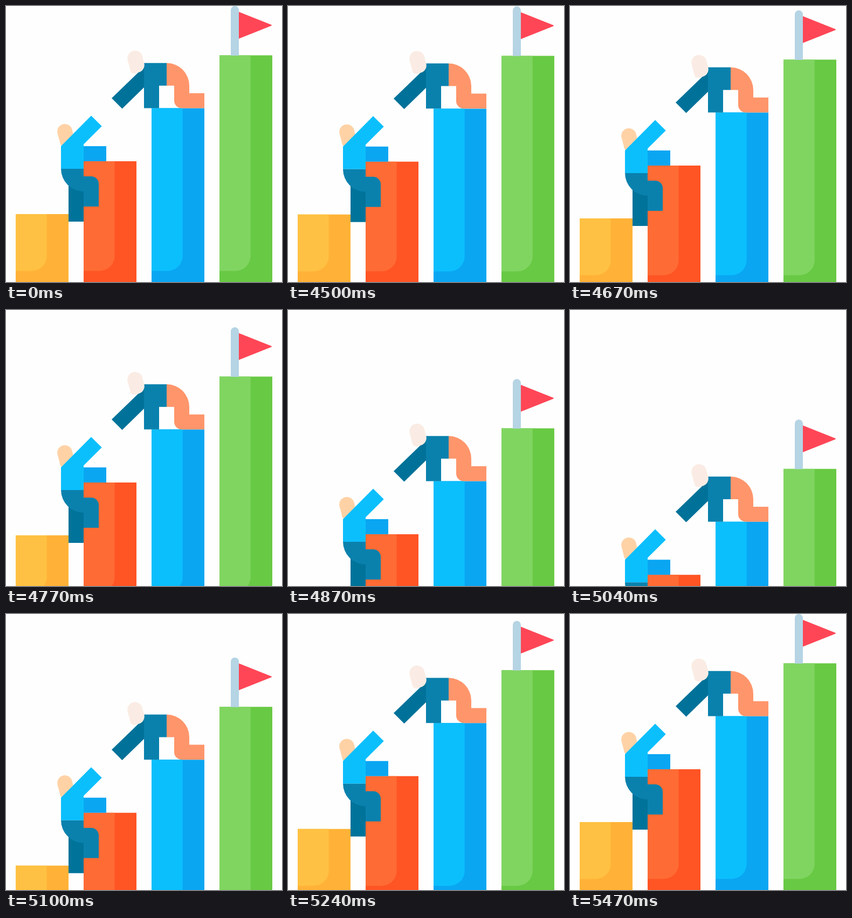
These frames come from a looping animation (512 px wide and 512 px high, 9940 ms). An HTML page:

```html
<!DOCTYPE html>
<html lang="en">
<head>
<meta charset="utf-8">
<title>Climbing the bars</title>
<style>
  html, body { margin: 0; width: 100%; height: 100%; overflow: hidden; background: #fefefe; }
  svg { display: block; width: 100%; height: 100%; overflow: hidden; }
</style>
</head>
<body>
<svg viewBox="0 0 512 512">
  <g id="scene">
    <g id="bars"></g>

    <!-- flag -->
    <path fill="#ff4656" d="M431 10.5L492 34.8Q494 35.8 492 36.8L431 61Z"/>
    <path fill="#b5d4e4" d="M417 92V7.5a7.5 7.5 0 0 1 15 0V92Z"/>

    <!-- helper -->
    <path fill="#007299" d="M196 171L256 113V151L215.5 190.5Z"/>
    <path fill="#0a81ad" d="M256 105.8H298V147.8H284V189.5H256Z"/>
    <path fill="#ff956b" d="M298 105.8a42 42 0 0 1 42 42V161.8H368V189.5H326a14 14 0 0 1-14-14V147.8H298Z"/>
    <path fill="#faece4" d="M225.4 99.5A14.2 14.2 0 0 1 252.6 91.8L256.3 106A14 14 0 0 1 246.5 123L239.5 124.9Q232.5 126 231 120.5Z"/>

    <!-- climber -->
    <path fill="#ffd2a6" d="M95.4 235.5A14 14 0 0 1 122.4 228.3L124.5 237L106 260L102 258Q100 256 99.3 250Z"/>
    <path fill="#00739a" d="M116 330H144V400H116Z"/>
    <path fill="#0aa6f2" d="M144 260H186V288H144Z"/>
    <path fill="#0bbffd" d="M102 260L158 203.5L177.7 223L144 256.5V302H102Z"/>
    <path fill="#0a81ad" d="M102 302H144V316H158a14 14 0 0 1 14 14V372H144V344A42 42 0 0 1 102 302Z"/>
  </g>
</svg>
<script>
  const LOOP = 9940, START = 4500, SPAN = 970, LAST = 29, HALF = 15;
  const scene = document.getElementById('scene');

  const bar = (x, top, light, dark) =>
    `<path fill="${dark}" d="M${x} ${top}H${x + 98}V512H${x}Z"/>` +
    `<path fill="${light}" d="M${x} ${top}H${x + 57.7}V463.5a28 28 0 0 1-28 28H${x}Z"/>`;

  document.getElementById('bars').innerHTML =
    bar(18, 386, '#ffc143', '#ffb237') +
    bar(144, 288, '#ff6b34', '#ff5424') +
    bar(270, 189.6, '#0bbffd', '#0aa6f2') +
    bar(396, 91.6, '#80d561', '#68c944');

  // Exponential drop out of view, then exponential rise back, in 30 steps.
  function offset(t) {
    if (t < START || t >= START + SPAN) return 0;
    const tick = Math.floor((t - START) / 10) + 0.5;
    const step = Math.floor(tick * LAST * 10 / SPAN) + 1;
    return 512 * 2 ** (-10 * Math.abs(step - HALF) / HALF);
  }

  function draw(t) {
    scene.setAttribute('transform', `translate(0 ${offset(t)})`);
  }

  const begin = performance.now();
  function loop() {
    draw((performance.now() - begin) % LOOP);
    requestAnimationFrame(loop);
  }
  loop();
</script>
</body>
</html>
```
